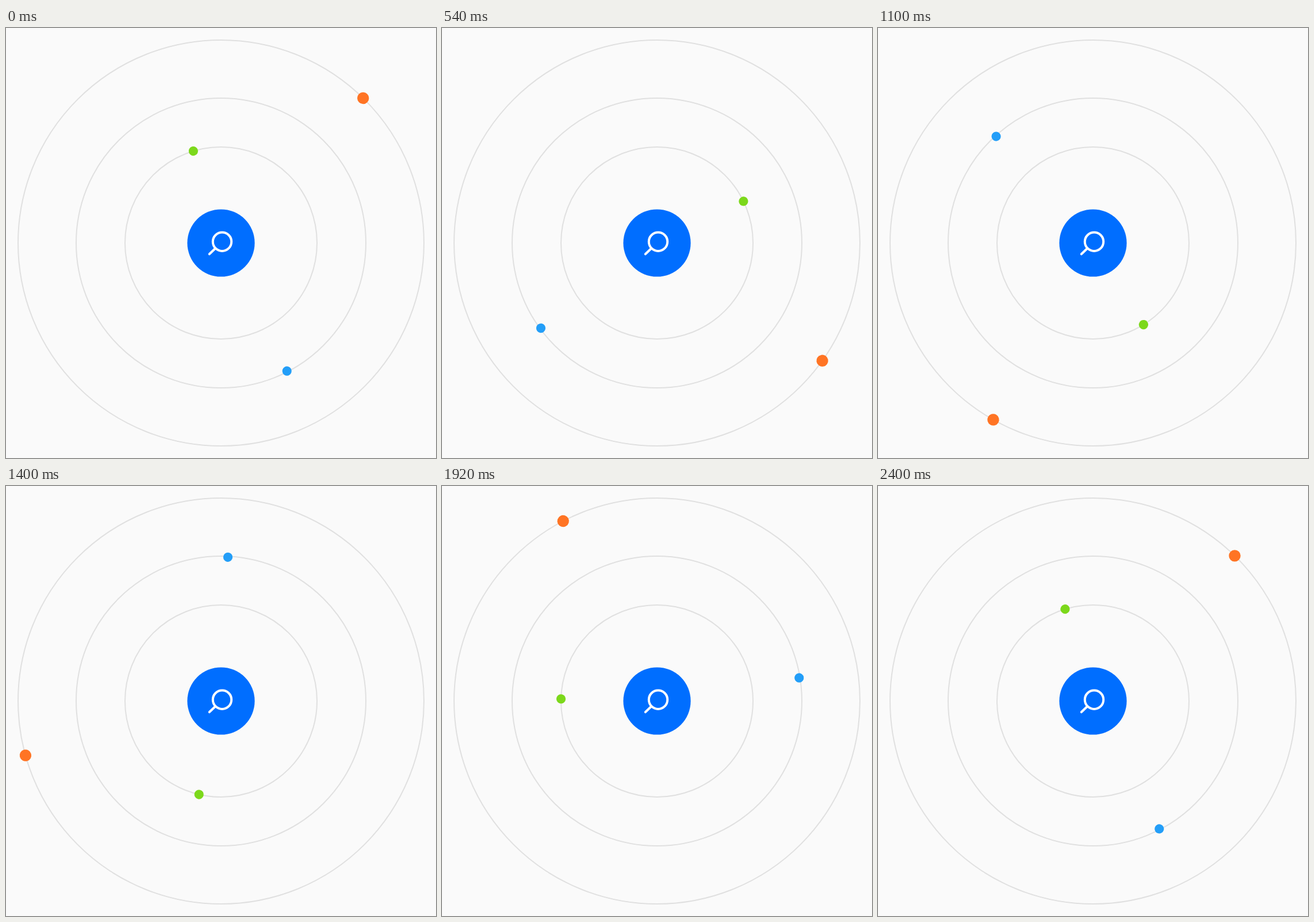
Recreate the animation shown at these times as an HTML page. Size 748 by 748 pixels, loop 2420 ms.

```html
<!DOCTYPE html>
<html lang="en">
<head>
<meta charset="utf-8">
<title>Orbiting search</title>
<style>
  html, body { margin: 0; height: 100%; overflow: hidden; background: #fafafa; }
  svg { display: block; width: 100%; height: 100%; }
</style>
</head>
<body>
<svg viewBox="-374 -374 748 748">
  <g fill="none" stroke="#e0e0e0" stroke-width="2">
    <circle r="353"/>
    <circle r="252"/>
    <circle r="167"/>
  </g>
  <circle r="58.6" fill="#006eff"/>
  <g fill="none" stroke="#fff" stroke-width="4" stroke-linecap="round">
    <circle cx="2" cy="-2.3" r="16.2"/>
    <path d="M-10 9.5L-20.2 19.3"/>
  </g>
  <g id="dots">
    <circle cx="353" r="10.2" fill="#ff7424" data-start="-45.7"/>
    <circle cx="250.5" r="8.1" fill="#239ef8" data-start="62.6"/>
    <circle cx="167" r="8.1" fill="#7cd81b" data-start="-106.9"/>
  </g>
</svg>
<script>
  const LOOP = 2420, TURN = 2400; // one full turn, then a short rest
  const dots = [...document.querySelectorAll('#dots circle')];

  function draw(now) {
    const turned = 360 * Math.min(now % LOOP, TURN) / TURN;
    for (const dot of dots) {
      dot.setAttribute('transform', `rotate(${+dot.dataset.start + turned})`);
    }
  }

  function tick(now) {
    draw(now);
    requestAnimationFrame(tick);
  }

  draw(0);
  requestAnimationFrame(tick);
</script>
</body>
</html>
```
